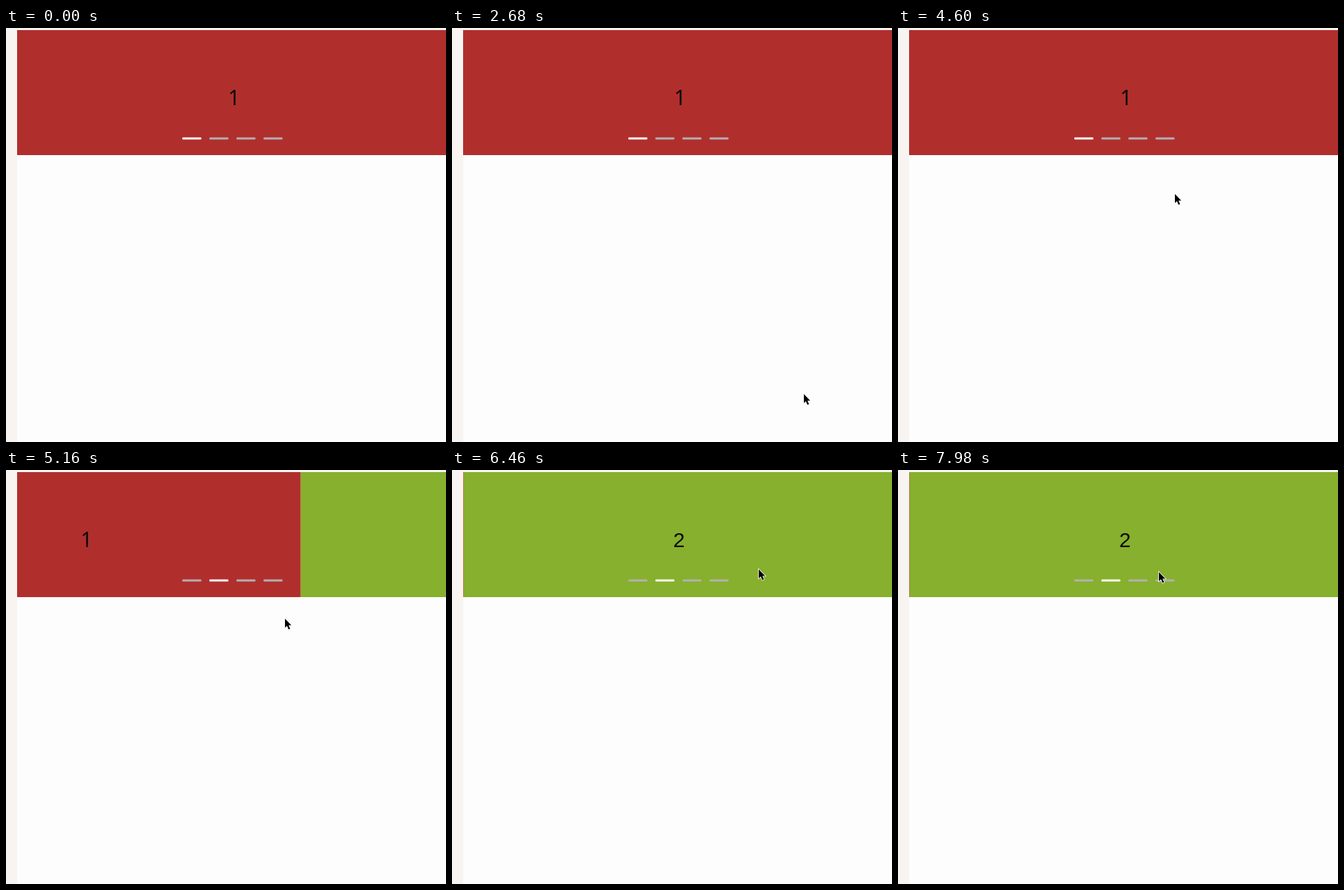
Write an HTML page with a canvas that moves like this. It is 634 px wide and 596 px high and loops after 8000 ms.

```html
<!DOCTYPE html>
<html lang="en">
<head>
<meta charset="utf-8">
<title>Carousel</title>
<style>
html, body { margin: 0; width: 100%; height: 100%; overflow: hidden; background: #fdfdfd; }
canvas { display: block; }
</style>
</head>
<body>
<canvas id="stage" width="634" height="596"></canvas>
<script>
const ctx = document.getElementById('stage').getContext('2d');
const LOOP = 8000;
const BANNER = { x: 16, y: 3, width: 621, height: 180 };
const SLIDE_START = 103.4, SLIDE_STEPS = 22.7;

// Pointer path: [step, x, y]
const PATH = [
  [49, 534, 600], [58, 507, 527], [70, 475, 443], [88, 446, 365],
  [98, 399, 239], [110, 402, 214], [116, 431, 148], [139, 442, 143],
  [142, 450, 148], [160, 420, 150], [166, 395, 163], [171, 376, 147]
];
const ARROW = new Path2D('M0 0V13L2.9 10.3L5.2 15.5L7.4 14.5L5.2 9.5H9.2Z');

function stepAt(time) {
  const phase = time % 140;
  return 3 * Math.floor(time / 140) + (phase >= 120 ? 2 : phase >= 20 ? 1 : 0);
}

// cubic-bezier(.4, 0, .2, 1)
function ease(x) {
  if (x <= 0) return 0;
  if (x >= 1) return 1;
  let low = 0, high = 1;
  for (let i = 0; i < 24; i++) {
    const u = (low + high) / 2, v = 1 - u;
    if (1.2 * v * v * u + 0.6 * v * u * u + u ** 3 < x) low = u; else high = u;
  }
  return low * low * (3 - 2 * low);
}

function rect(x, y, width, height, color) {
  ctx.fillStyle = color;
  ctx.fillRect(x, y, width, height);
}

function drawDigit(text, x, font) {
  ctx.font = font;
  ctx.fillStyle = '#0c0a08';
  ctx.textAlign = 'center';
  ctx.fillText(text, x, 111);
}

function drawBanner(step) {
  const { x, y, width, height } = BANNER;
  const shift = Math.min(width - 1, width * ease((step - SLIDE_START) / SLIDE_STEPS));
  const seam = Math.round(x + width - shift);
  const center = x + width / 2 - shift;
  ctx.save();
  ctx.beginPath();
  ctx.rect(x, y, width, height);
  ctx.clip();
  rect(x, y, width, height, '#b02f2d');
  rect(seam, y, width, height, '#86b02d');
  rect(seam - 1, y, 1, height, '#c07a50');
  drawDigit('1', center + 2, '30px "Noto Sans", "Open Sans", sans-serif');
  drawDigit('2', center + width - 0.5, '30px "Liberation Sans", Arial, sans-serif');
  ctx.restore();
}

function drawIndicators(active) {
  for (let i = 0; i < 4; i++) {
    ctx.fillStyle = i === active ? '#fdfdfd' : '#b4b0b4';
    ctx.beginPath();
    ctx.roundRect(254 + 39 * i, 157.5, 27.5, 3, 1.2);
    ctx.fill();
  }
}

function drawPointer(step) {
  const next = PATH.findIndex(point => point[0] >= step);
  if (next < 1) return;
  const [s0, x0, y0] = PATH[next - 1], [s1, x1, y1] = PATH[next];
  const k = (step - s0) / (s1 - s0);
  ctx.save();
  ctx.translate(Math.round(x0 + (x1 - x0) * k), Math.round(y0 + (y1 - y0) * k));
  ctx.lineWidth = 1.6;
  ctx.strokeStyle = '#fdfdfd';
  ctx.stroke(ARROW);
  ctx.fillStyle = '#000';
  ctx.fill(ARROW);
  ctx.restore();
}

function draw() {
  const step = stepAt(performance.now() % LOOP);
  rect(0, 0, 634, 596, '#f8f4f2');
  rect(16, 3, 618, 593, '#fdfdfd');
  drawBanner(step);
  drawIndicators(step > SLIDE_START ? 1 : 0);
  drawPointer(step);
  requestAnimationFrame(draw);
}
draw();
</script>
</body>
</html>
```
